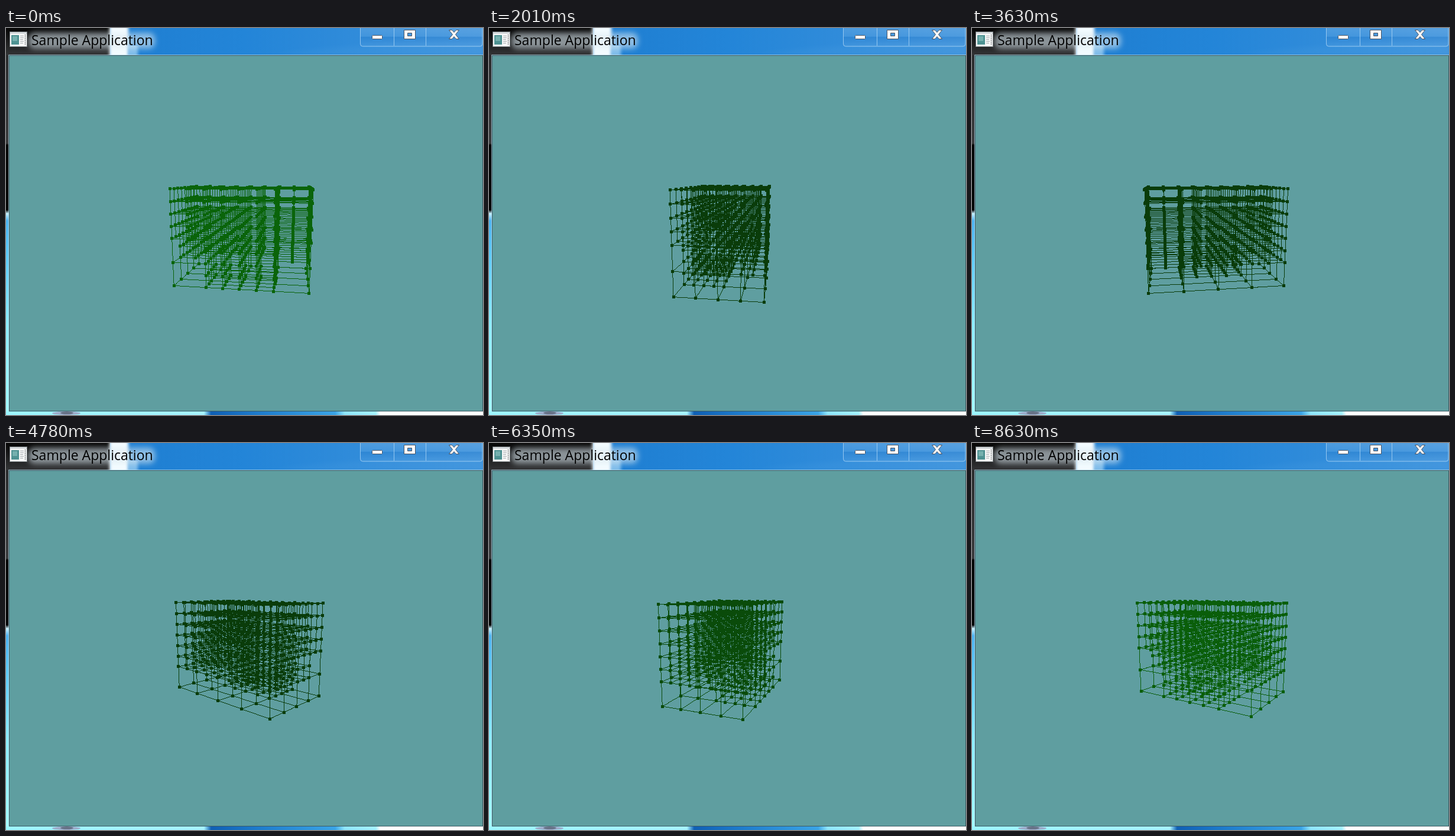
Write an HTML page with a canvas that moves like this. It is 807 px wide and 654 px high and loops after 8710 ms.

```html
<!DOCTYPE html>
<html lang="en">
<head>
<meta charset="utf-8">
<title>Sample Application</title>
<style>
  html, body { margin: 0; width: 100%; height: 100%; overflow: hidden; background: #5f9ea0; }
  svg, canvas { position: absolute; display: block; }
  svg { left: 0; top: 0; }
</style>
</head>
<body>
<svg width="807" height="654" viewBox="0 0 807 654">
  <defs>
    <linearGradient id="sky" x2="1" y2="0">
      <stop offset="0" stop-color="#1b78cb"/>
      <stop offset=".5" stop-color="#2385d8"/>
      <stop offset="1" stop-color="#3f93dc"/>
    </linearGradient>
    <linearGradient id="dark" x2="0" y2="1">
      <stop offset="0" stop-color="#050505"/>
      <stop offset="1" stop-color="#333436"/>
    </linearGradient>
    <linearGradient id="side" x2="0" y2="1">
      <stop offset="0" stop-color="#2b2c2e"/>
      <stop offset=".245" stop-color="#3a3b3d"/>
      <stop offset=".25" stop-color="#020202"/>
      <stop offset=".43" stop-color="#020202"/>
      <stop offset=".44" stop-color="#c8f2ff"/>
      <stop offset=".46" stop-color="#4fb4f2"/>
      <stop offset=".56" stop-color="#5fcbf8"/>
      <stop offset=".75" stop-color="#8eeeff"/>
      <stop offset="1" stop-color="#a4fbff"/>
    </linearGradient>
    <linearGradient id="floor" x2="1" y2="0">
      <stop offset="0" stop-color="#9df6ff"/>
      <stop offset=".415" stop-color="#a6f3ff"/>
      <stop offset=".43" stop-color="#0f5fb4"/>
      <stop offset=".53" stop-color="#1e7ccc"/>
      <stop offset=".69" stop-color="#3aa4e6"/>
      <stop offset=".71" stop-color="#8fe6fc"/>
      <stop offset=".775" stop-color="#a4f2ff"/>
      <stop offset=".785" stop-color="#fff"/>
      <stop offset="1" stop-color="#fff"/>
    </linearGradient>
    <linearGradient id="button" x2="0" y2="1">
      <stop offset="0" stop-color="#fff" stop-opacity=".14"/>
      <stop offset=".48" stop-color="#fff" stop-opacity=".08"/>
      <stop offset=".5" stop-color="#003c8c" stop-opacity=".08"/>
      <stop offset="1" stop-color="#fff" stop-opacity=".06"/>
    </linearGradient>
    <filter id="blur" x="-20%" y="-60%" width="140%" height="220%"><feGaussianBlur stdDeviation="5"/></filter>
    <filter id="soft" x="-50%" width="200%"><feGaussianBlur stdDeviation="2.5 0"/></filter>
  </defs>

  <rect width="807" height="654" fill="url(#sky)"/>
  <path d="M450 46Q620 22 807 30V46Z" fill="#69b3ea" opacity=".12" filter="url(#blur)"/>
  <rect width="176" height="46" fill="url(#dark)"/>
  <rect x="175" width="32" height="46" fill="#f4fcff" filter="url(#soft)"/>
  <rect x="207" y="30" width="16" height="16" fill="#bfe6fb" opacity=".6" filter="url(#soft)"/>
  <rect x="38" y="8" width="214" height="27" rx="10" fill="#dceaf2" opacity=".58" filter="url(#blur)"/>
  <rect y="46" width="6" height="608" fill="url(#side)"/>
  <rect y="648" width="807" height="6" fill="url(#floor)"/>
  <ellipse cx="102" cy="651" rx="24" ry="3" fill="#9cabc9"/>
  <ellipse cx="103" cy="650.5" rx="11" ry="2" fill="#626c80"/>

  <g shape-rendering="crispEdges">
    <rect x="6" y="6" width="30" height="26" fill="#777d80"/>
    <rect x="7" y="7" width="28" height="24" fill="#f7f8f8"/>
    <rect x="7" y="7" width="28" height="3" fill="#d5d9dc"/>
    <rect x="9" y="12" width="13" height="16" fill="#4e9292"/>
    <rect x="11" y="14" width="8" height="8" fill="#75b0ae"/>
    <path d="M24 13.5h6M24 16.5h6M24 19.5h5M24 22.5h6M24 25.5h5" stroke="#a4a9ac"/>
    <path d="M32.5 11v17" stroke="#53585b" stroke-dasharray="2 1"/>
  </g>
  <text x="43" y="29" font-family="'Open Sans','Noto Sans',sans-serif" font-size="23" fill="#000">Sample Application</text>

  <path d="M599.5 -1V27q0 4 4 4H802q4 0 4-4V-1Z" fill="url(#button)" stroke="#a9d3f4" stroke-opacity=".85"/>
  <path d="M656.5 0V30M710.5 0V30" stroke="#a9d3f4" stroke-opacity=".85"/>
  <g fill="#fff" stroke="#4a5362">
    <rect x="619.5" y="12.5" width="17" height="6" rx="1"/>
    <path fill-rule="evenodd" d="M673.5 3.5h19v15h-19ZM679.5 8.5v5h7v-5Z"/>
    <path d="M749.5 3.5h5l3.5 4 3.5-4h5l-6 7.5 6 7.5h-5l-3.5-4-3.5 4h-5l6-7.5Z"/>
  </g>

  <path d="M4.5 648.5V45.5H807" fill="none" stroke="#b5dbe8" opacity=".75"/>
  <rect x="5.5" y="46.5" width="801" height="601" fill="#5f9ea0" stroke="#3b5a64"/>
</svg>
<canvas id="view"></canvas>

<script>
const LOOP = 8710;
// Start and end of each run of evenly spaced picture changes.
const RUNS = [[70, 920], [990, 1840], [1920, 2790], [2870, 3720], [3800, 4630],
              [4710, 5540], [5640, 6500], [6570, 7430], [7530, 8390], [8470, 8630]];
// Changes are rounded to coarse ticks, so a picture may appear this much early.
const EARLY = 13;
// Time and heading in degrees.
const TURN = [[0, -9], [1999, -98.5], [3643, -171], [4785, -223.2],
              [6344, -292.7], [7765, -355.1], [8630, -392.4]];

const VIEW = { left: 262, top: 256, width: 288, height: 224 };
const CENTER = { x: 405.8, y: 347 };
const FOCAL = 519.6;
const PITCH = 10.2 * Math.PI / 180;
const DISTANCE = 3.05;
const TOP_DROP = 0.095;
const SIZE = [1.253, 0.905, 0.77];

const canvas = document.getElementById('view');
canvas.width = VIEW.width;
canvas.height = VIEW.height;
canvas.style.left = VIEW.left + 'px';
canvas.style.top = VIEW.top + 'px';
const ctx = canvas.getContext('2d');
const image = ctx.createImageData(VIEW.width, VIEW.height);
const pixels = new Uint32Array(image.data.buffer);

// Octree leaves: an 8 x 8 x 8 grid whose lower outer blocks stay undivided.
function isDivided(i, j, k) {
  const inner = i === 1 || i === 2;
  if (j === 3) return inner && k < 2;
  if (j === 2) return inner || k > 0;
  return true;
}

function buildLattice() {
  const nodes = new Map(), edges = new Map();
  const nodeId = p => {
    const key = p.join();
    if (!nodes.has(key)) nodes.set(key, { id: nodes.size, p });
    return nodes.get(key).id;
  };
  const addCell = (origin, size) => {
    for (let corner = 0; corner < 8; corner++) {
      const from = origin.map((o, axis) => o + (corner >> axis & 1) * size);
      for (let axis = 0; axis < 3; axis++) {
        if (corner >> axis & 1) continue;
        const to = from.slice();
        to[axis] += size;
        const edge = [nodeId(from), nodeId(to)];
        edges.set(edge.join(), edge);
      }
    }
  };
  for (let n = 0; n < 64; n++) {
    const block = [n & 3, n >> 2 & 3, n >> 4];
    const origin = block.map(v => v * 2);
    if (!isDivided(...block)) { addCell(origin, 2); continue; }
    for (let c = 0; c < 8; c++) addCell(origin.map((o, axis) => o + (c >> axis & 1)), 1);
  }
  return { nodes: [...nodes.values()].map(n => n.p), edges: [...edges.values()] };
}

const lattice = buildLattice();

function project([i, j, k], cos, sin) {
  const a = (i / 8 - 0.5) * SIZE[0], b = (k / 8 - 0.5) * SIZE[2];
  const drop = TOP_DROP + j / 8 * SIZE[1];
  const x = a * cos - b * sin, z = DISTANCE + a * sin + b * cos;
  const depth = z * Math.cos(PITCH) + drop * Math.sin(PITCH);
  const down = drop * Math.cos(PITCH) - z * Math.sin(PITCH);
  return [CENTER.x - VIEW.left + FOCAL * x / depth, CENTER.y - VIEW.top + FOCAL * down / depth];
}

function drawLine([x0, y0], [x1, y1], color) {
  const dx = x1 - x0, dy = y1 - y0;
  const steps = Math.max(1, Math.ceil(Math.max(Math.abs(dx), Math.abs(dy))));
  for (let s = 0; s <= steps; s++) {
    const x = Math.floor(x0 + dx * s / steps), y = Math.floor(y0 + dy * s / steps);
    pixels[y * VIEW.width + x] = color;
  }
}

function drawDot([x, y], color) {
  const left = Math.round(x - 2.5), top = Math.round(y - 2.5);
  for (let row = top; row < top + 5; row++) {
    const start = row * VIEW.width + left;
    pixels.fill(color, start, start + 5);
  }
}

function heading(time) {
  let n = 1;
  while (n < TURN.length - 1 && time > TURN[n][0]) n++;
  const [t0, a0] = TURN[n - 1], [t1, a1] = TURN[n];
  return (a0 + (a1 - a0) * (time - t0) / (t1 - t0)) * Math.PI / 180;
}

function heldTime(time) {
  let held = 0;
  for (const [start, end] of RUNS) {
    if (time < start) break;
    const steps = Math.round((end - start) / 78);
    const gap = (end - start) / steps;
    held = start + Math.min(steps, Math.floor((time - start + EARLY) / gap)) * gap;
  }
  return held;
}

function draw(time) {
  const angle = heading(time), cos = Math.cos(angle), sin = Math.sin(angle);
  const green = Math.round(60 + 40 * Math.max(0, cos));
  const color = (0xff000000 | 10 << 16 | green << 8 | 10) >>> 0;
  const points = lattice.nodes.map(p => project(p, cos, sin));
  pixels.fill(0);
  for (const [from, to] of lattice.edges) drawLine(points[from], points[to], color);
  for (const point of points) drawDot(point, color);
  ctx.putImageData(image, 0, 0);
}

let shown = -1;
const startTime = performance.now();
function tick() {
  const time = heldTime((performance.now() - startTime) % LOOP);
  if (time !== shown) draw(shown = time);
  requestAnimationFrame(tick);
}
tick();
</script>
</body>
</html>
```
